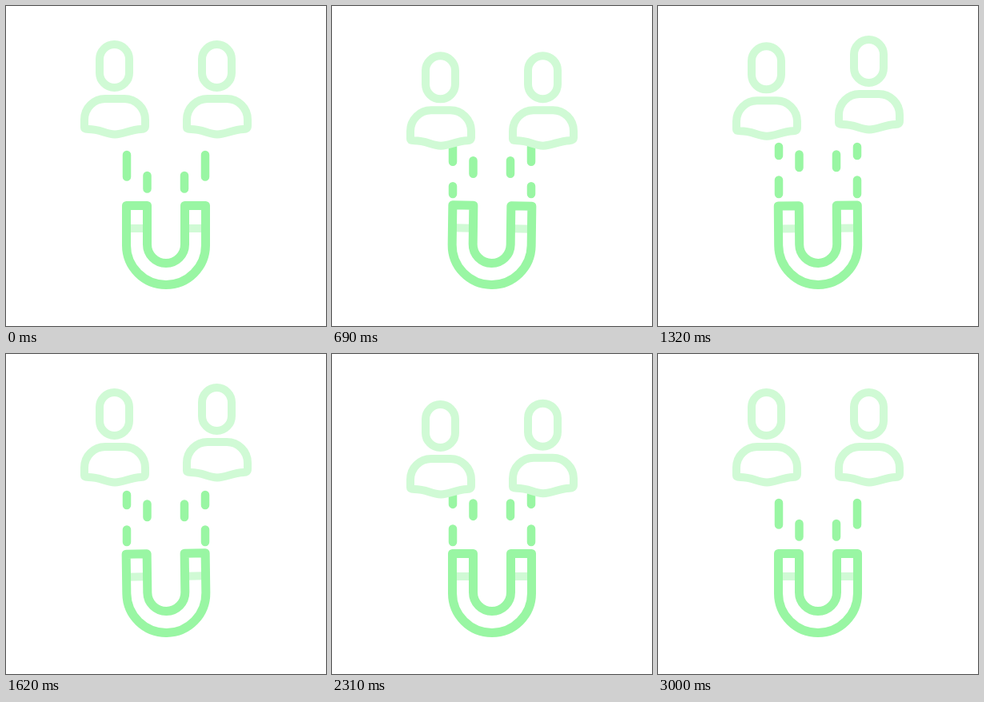
Recreate the animation shown at these times as an HTML page. Size 400x400 px, loop 3090 ms.

```html
<!DOCTYPE html>
<html lang="en">
<head>
<meta charset="utf-8">
<title>Magnet attracting people</title>
<style>
  html, body { margin: 0; width: 100%; height: 100%; overflow: hidden; background: #fff; }
  svg { display: block; width: 100%; height: 100%; }
  path, rect { fill: none; stroke-width: 10; stroke-linecap: round; stroke-linejoin: round; }
  .dark { stroke: #99f6a3; }
  .dark path { stroke-width: 10.5; }
  .light { stroke: #d0fad5; }
  .band { stroke-linecap: butt; }
  .body { stroke-width: 11; }
</style>
</head>
<body>
<svg viewBox="0 0 400 400">
  <defs>
    <g id="person">
      <rect x="117" y="48" width="37" height="54" rx="18.5"/>
      <path d="M98 152V142A26 26 0 0 1 124 116H148A26 26 0 0 1 174 142V150Q174 154 169 154C155 154.500 148 160 136 160.500C124 160 118 154 103 154Q98 154 98 152Z"/>
    </g>
  </defs>
  <g class="dark">
    <path class="outer" d="M151 176V235M249 176V235"/>
    <path class="inner" d="M176.500 176V235M223 176V235"/>
  </g>
  <g id="magnet">
    <path class="light band" d="M152 278H175M225 278H248"/>
    <path class="dark body" d="M150.500 249.500H176.500V298A23.500 23.500 0 0 0 223.500 298V249.500H249.500V299A49.500 49.500 0 0 1 150.500 299Z"/>
  </g>
  <g class="light">
    <use id="left" href="#person"/>
    <use id="right" href="#person" x="128"/>
  </g>
</svg>
<script>
const LOOP = 3090, STEP = 30, END = 3000;
const PULSE = 1000, PULSE_PEAK = 440, PULSE_LIFT = 32;
const DROP = 15, RISE = -6;

// Turning points as [time in ms, value]
const leftDrop = [[0, 0], [800, DROP], [1500, 0], [1860, 0], [2300, DROP], [END, 0]];
const rightDrop = [[0, 0], [550, DROP], [600, DROP], [1320, RISE], [1640, RISE], [1950, DROP], [2150, DROP], [END, 0]];
const tilt = [[0, 0], [650, 0.8], [1600, -0.8], [1900, -0.8], [2300, 0], [END, 0]];

const ease = u => (1 - Math.cos(Math.PI * u)) / 2;

function swing(keys, t) {
  const i = Math.max(1, keys.findIndex(([time]) => time >= t));
  const [t0, v0] = keys[i - 1], [t1, v1] = keys[i];
  return v0 + (v1 - v0) * ease((t - t0) / (t1 - t0));
}

// The dashes rise and sink back once per pulse
function lift(t) {
  const p = t % PULSE;
  const u = p < PULSE_PEAK ? p / PULSE_PEAK : (PULSE - p) / (PULSE - PULSE_PEAK);
  return PULSE_LIFT * ease(u);
}

const find = selector => document.querySelector(selector);
const place = (selector, value) => find(selector).setAttribute('transform', value);

function setDash(selector, length, gap, start) {
  const path = find(selector);
  path.setAttribute('stroke-dasharray', `${length} ${gap}`);
  path.setAttribute('stroke-dashoffset', -start);
}

function draw(t) {
  place('#left', `translate(0 ${swing(leftDrop, t)})`);
  place('#right', `translate(0 ${swing(rightDrop, t)})`);
  place('#magnet', `rotate(${swing(tilt, t)} 200 275)`);
  setDash('.outer', 27.5, 30.5, 10 - lift(t));
  setDash('.inner', 16.5, 60, 36 - lift(t));
}

const begin = performance.now();
function tick() {
  const t = (performance.now() - begin) % LOOP;
  draw(Math.min(Math.floor(t / STEP) * STEP, END));
  requestAnimationFrame(tick);
}
tick();
</script>
</body>
</html>
```
